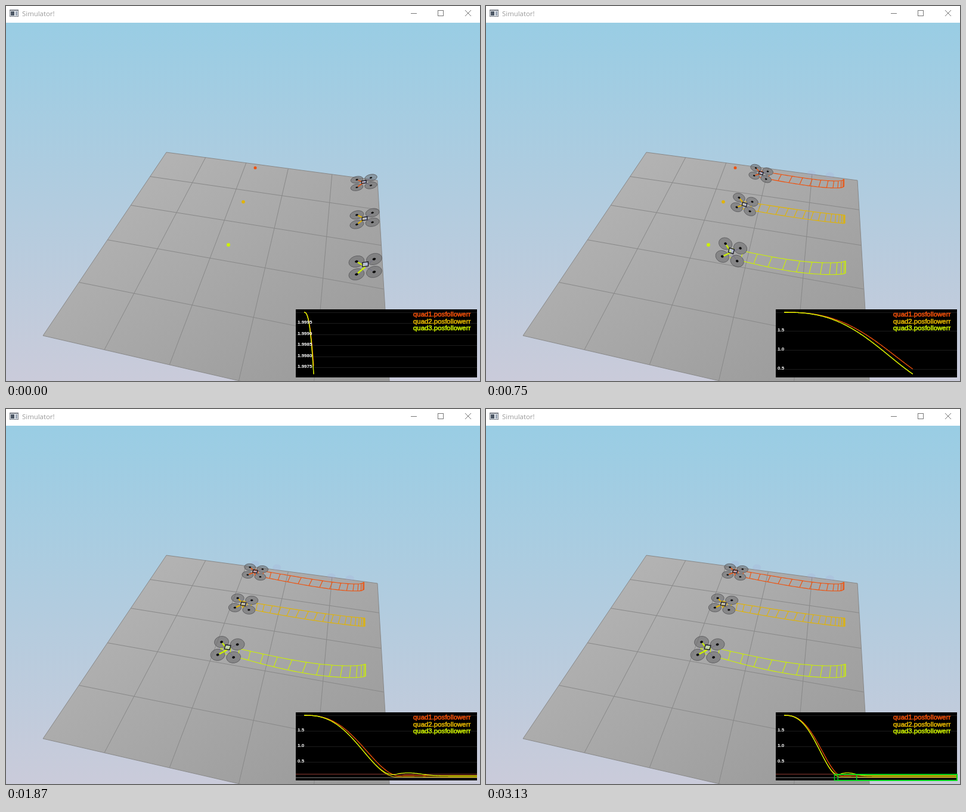
An HTML page with a canvas that plays this animation: 795x628 px, repeating every 3.25 s.

```html
<!DOCTYPE html>
<html lang="en">
<head>
<meta charset="utf-8">
<title>Simulator</title>
<style>
  html, body { margin: 0; width: 100%; height: 100%; overflow: hidden; }
  canvas { display: block; }
</style>
</head>
<body>
<canvas id="stage" width="795" height="628"></canvas>
<script>
const ctx = document.getElementById('stage').getContext('2d');
const LOOP = 3250, STEP = 125, LAST_STEP = 25;
const THRESHOLD = .1, HOLD = 450, BUMP_TIME = 311;

// travel: flight duration; rest and bump: error left over after arrival.
// width and depth: drone size on screen; sag and skew: bend of the flight path.
const drones = [
  { name: 'quad1.posfollowerr', color: '#f0500a', target: [418, 271, 2.5],
    from: [600.5, 296], to: [417.8, 274], sag: 6, skew: .5, ribbon: [6, 4.8], ribStep: 16.7,
    width: 23.5, depth: 12.8, lift: -1, arm: 1.5, travel: 298, rest: .06, bump: .01 },
  { name: 'quad2.posfollowerr', color: '#e2b400', target: [398, 328, 2.8],
    from: [601.8, 357], to: [398, 327.5], sag: 2, skew: .7, ribbon: [7, 5.7], ribStep: 12,
    width: 26.2, depth: 16, lift: 0, arm: 2, travel: 282, rest: .012, bump: .01 },
  { name: 'quad3.posfollowerr', color: '#ccf000', target: [373, 400, 3],
    from: [603, 437.3], to: [371.6, 404], sag: 10, skew: .7, ribbon: [10.2, 7], ribStep: 16.7,
    width: 29.5, depth: 21.5, lift: -4, arm: 2.4, travel: 282, rest: .05, bump: .1 }
];

const mix = (a, b, s) => a + (b - a) * s;
const bell = x => Math.exp(-x * x);
const clock = k => 16 + 33.3 * k;

// Motion model
const remaining = (d, t) => (1 - Math.min(1, t / d.travel) ** 2.6) ** 2.43;
const bumpAt = (d, t) => d.bump * bell((t - BUMP_TIME) / 55);
const errorAt = (d, t) =>
  2 * remaining(d, t) + d.rest * Math.min(1, t / d.travel) ** 12 + bumpAt(d, t);

// Share of the way covered on screen; perspective makes the middle run ahead.
function progress(d, t) {
  const p = 1 - remaining(d, t);
  return p + .08 * p * (1 - p) + bumpAt(d, t) / 2;
}

function settleTime(d) {
  let t = 600;
  while (errorAt(d, t) < THRESHOLD) t--;
  return t;
}
drones.forEach(d => d.settled = settleTime(d));

function pathPoint(d, s) {
  const sag = d.sag * Math.sin(Math.PI * Math.min(1, s) ** d.skew);
  return [mix(d.from[0], d.to[0], s), mix(d.from[1], d.to[1], s) + sag];
}

// Drone plane on screen: centre plus two diagonal arm vectors.
function poseOf(d, k) {
  const s = progress(d, clock(k)), brake = bell((k - 8) / 2);
  const [x, y] = pathPoint(d, s);
  const ux = d.width * (1 - .1 * s - .2 * brake), uy = d.width * (-.14 + .28 * s + .46 * brake);
  const vx = d.depth * .3 * s, vy = -d.depth;
  return {
    x, y: y - 1, brake,
    ax: (ux + vx) / 2, ay: (uy + vy) / 2,
    bx: (ux - vx) / 2, by: (uy - vy) / 2
  };
}

// Drawing helpers
function path(points, close) {
  ctx.beginPath();
  points.forEach(([x, y]) => ctx.lineTo(x, y));
  if (close) ctx.closePath();
}

function line(x1, y1, x2, y2) {
  path([[x1, y1], [x2, y2]]);
  ctx.stroke();
}

function pen(color, width = 1) {
  ctx.strokeStyle = color;
  ctx.lineWidth = width;
}

function box(color, x, y, w, h) {
  ctx.fillStyle = color;
  ctx.fillRect(x, y, w, h);
}

function disc(x, y, rx, ry, color) {
  ctx.beginPath();
  ctx.ellipse(x, y, rx, ry, 0, 0, 2 * Math.PI);
  ctx.fillStyle = color;
  ctx.fill();
}

function drawWindowBar() {
  box('#fff', 0, 0, 795, 28);
  box('#7b8088', 6, 6, 15, 12);
  box('#e6ebf0', 7, 8, 13, 9);
  box('#4c5664', 8, 9, 6, 7);
  box('#9aa5b4', 16, 9, 3, 7);
  ctx.fillStyle = '#999';
  ctx.font = '11.4px "Open Sans", sans-serif';
  ctx.fillText('Simulator!', 27, 17);
  pen('#777');
  line(679, 12.5, 689, 12.5);
  ctx.strokeRect(724.5, 7.5, 9, 9);
  line(770, 7, 780, 17);
  line(780, 7, 770, 17);
}

// Perspective map of the unit square onto the floor.
function floorPoint(u, v) {
  const w = 1 - .08857 * u - .3908 * v;
  return [(269 + 298.82 * u - 231.2 * v) / w, (245 + 21.14 * u + 91.3 * v) / w];
}

function drawWorld() {
  const sky = ctx.createLinearGradient(0, 28, 0, 628);
  sky.addColorStop(0, '#99cde4');
  sky.addColorStop(1, '#cacbda');
  box(sky, 0, 28, 795, 600);

  const floor = ctx.createLinearGradient(230, 240, 520, 660);
  floor.addColorStop(0, '#b4b4b4');
  floor.addColorStop(1, '#9b9b9b');
  path([floorPoint(0, 0), floorPoint(1, 0), floorPoint(1, 1), floorPoint(0, 1)], true);
  ctx.fillStyle = floor;
  ctx.fill();
  pen('#888');
  for (let i = 0; i <= 5; i++) {
    line(...floorPoint(i / 5, 0), ...floorPoint(i / 5, 1));
    line(...floorPoint(0, i / 5), ...floorPoint(1, i / 5));
  }
}

// Faint marks left in the air above the farthest path.
function drawGhosts(t) {
  const d = drones[0];
  for (const s of [.13, .3, .8, 1]) {
    const [x, y] = pathPoint(d, s);
    if (progress(d, t) > s - .01) disc(x, y - 15, 7, 5, 'rgba(165,165,215,.2)');
  }
}

const rotors = [[0, -1], [-1, 0], [1, 0], [0, 1]];
const onPlane = (p, a, b, lift = 0) =>
  [p.x + a * p.ax + b * p.bx, p.y + a * p.ay + b * p.by + lift];

function planeCircle(p, [a, b], r) {
  ctx.save();
  ctx.transform(p.ax, p.ay, p.bx, p.by, p.x, p.y);
  ctx.moveTo(a + r, b);
  ctx.arc(a, b, r, 0, 2 * Math.PI);
  ctx.restore();
}

function drawRotors(p) {
  for (const r of rotors) {
    ctx.beginPath();
    planeCircle(p, r, .62);
    ctx.fillStyle = 'rgba(100,100,102,.5)';
    ctx.fill();
    pen('#5c5c5e', .9);
    ctx.stroke();
  }
}

function hideBehindRotors(p) {
  for (const r of rotors) {
    ctx.beginPath();
    ctx.rect(0, 0, 795, 628);
    planeCircle(p, r, .62);
    ctx.clip('evenodd');
  }
}

function trailEdges(d, s) {
  const [x, y] = pathPoint(d, s), half = mix(...d.ribbon, s);
  const lean = .03 * (d.from[0] - d.to[0]) * Math.sin(Math.PI * Math.min(s, 1));
  return [[x, y - half], [x - lean, y + half]];
}

function drawTrail(d, t, p) {
  const now = Math.min(t, BUMP_TIME), end = progress(d, now);
  if (end < .01) return;
  ctx.save();
  // While braking the rear rotors dip below the trail.
  if (p.brake < .5) hideBehindRotors(p);
  pen(d.color, 1.1);
  const samples = Array.from({ length: 51 }, (_, i) => trailEdges(d, end * i / 50));
  for (const side of [0, 1]) {
    path(samples.map(s => s[side]));
    ctx.stroke();
  }
  for (let rib = 0; rib <= now; rib += d.ribStep) {
    const [top, bottom] = trailEdges(d, progress(d, rib));
    line(...top, ...bottom);
  }
  ctx.restore();
}

function drawBody(d, p) {
  for (const [a, b] of rotors) {
    const rear = a + b > 0;
    pen(rear ? 'rgba(80,70,140,.35)' : d.color, rear ? 1 : d.arm);
    line(...onPlane(p, a * .85, b * .85), p.x, p.y);
  }
  for (const r of rotors) {
    ctx.beginPath();
    planeCircle(p, r, .13);
    ctx.fillStyle = '#0c0c0c';
    ctx.fill();
  }
  const lift = d.lift * (1 - p.brake), h = .33;
  path([[h, 0], [0, h], [-h, 0], [0, -h]].map(([a, b]) => onPlane(p, a, b, lift)), true);
  ctx.fillStyle = 'rgba(190,200,238,.65)';
  ctx.fill();
  pen('#15151c', 1.3);
  ctx.stroke();
}

// Largest 1-2-5 step that splits the range into at least three parts.
function tickStep(range) {
  const rough = range / 3, base = 10 ** Math.floor(Math.log10(rough));
  return [5, 2, 1].find(m => m * base <= rough) * base;
}

function drawChart(now) {
  const width = Math.min(now, 290), count = 200;
  const curves = drones.map(d =>
    Array.from({ length: count + 1 }, (_, i) => errorAt(d, now * i / count)));
  const min = Math.min(...curves.flat()), range = 2 - min;
  const px = t => 500 + t / now * width;
  const py = e => 513 + (2 - e) / range * 103.5;
  const level = (e, color) => {
    const y = Math.floor(py(e)) + .5;
    pen(color);
    line(486, y, 790, y);
  };

  ctx.save();
  ctx.beginPath();
  ctx.rect(486, 508, 304, 114);
  ctx.clip();
  box('#000', 486, 508, 304, 114);

  const step = tickStep(range), digits = -Math.floor(Math.log10(step) + 1e-9);
  const ticks = [];
  for (let i = Math.round(2 / step); py(i * step) < 621; i--) ticks.push(i * step);
  ticks.forEach(v => level(v, '#1c1c1c'));
  level(THRESHOLD, '#8c3a30');
  level(0, '#777');

  curves.forEach((values, i) => {
    path(values.map((e, j) => [px(now * j / count), py(e)]));
    pen(drones[i].color, 1.3);
    ctx.stroke();
  });

  ctx.fillStyle = '#fff';
  ctx.font = 'bold 8px "Liberation Sans", Arial, sans-serif';
  ticks.filter(v => v < 2 - step / 2 && v > min)
    .forEach(v => ctx.fillText(v.toFixed(digits), 489, py(v) + .5));

  ctx.font = '11.4px "Liberation Sans", Arial, sans-serif';
  drones.forEach((d, i) => {
    const y = 520 + 11.5 * i;
    ctx.fillStyle = d.color;
    pen(d.color, .6);
    ctx.fillText(d.name, 683, y);
    ctx.strokeText(d.name, 683, y);
  });
  ctx.restore();

  // A box marks each curve that has stayed below the threshold long enough.
  pen('#00e01c', 1.4);
  for (const d of drones) {
    if (now < d.settled + HOLD) continue;
    const x = px(d.settled), y = py(THRESHOLD);
    ctx.strokeRect(x, y, 790 - x, 622 - y);
  }
}

function draw(k) {
  const t = clock(k);
  drawWorld();
  drawWindowBar();
  drawGhosts(t);
  for (const { target: [x, y, r], color } of drones) disc(x, y, r, r, color);
  for (const d of drones) {
    const pose = poseOf(d, k);
    drawRotors(pose);
    drawTrail(d, t, pose);
    drawBody(d, pose);
  }
  drawChart(t);
}

const start = performance.now();
function tick() {
  const t = (performance.now() - start) % LOOP;
  draw(Math.min(LAST_STEP, Math.floor((t + 5) / STEP)));
  requestAnimationFrame(tick);
}
tick();
</script>
</body>
</html>
```
